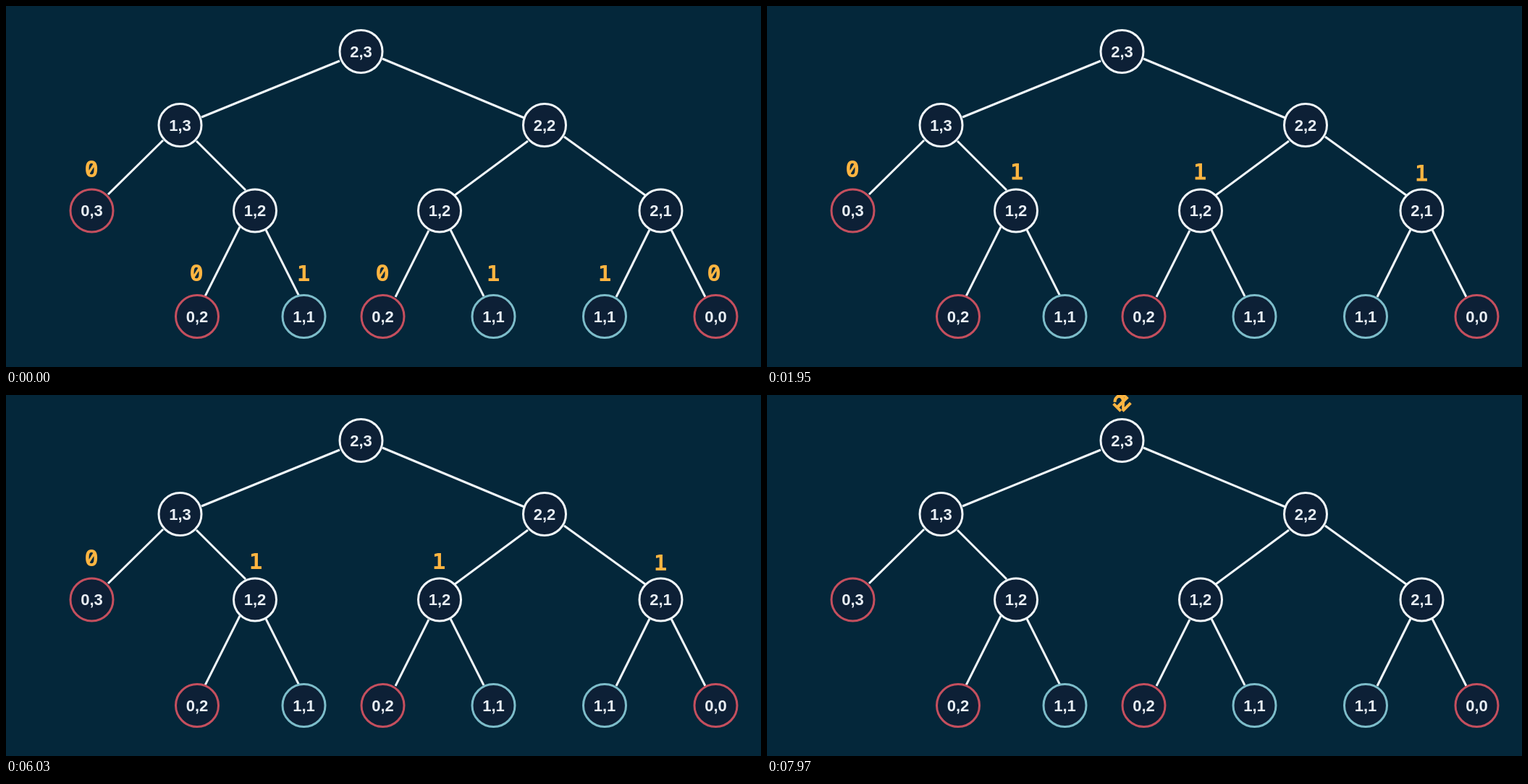
Recreate the animation shown at these times as an HTML page. Size 1043 by 500 pixels, loop 8000 ms.

```html
<!DOCTYPE html>
<html lang="en">
<head>
<meta charset="utf-8">
<title>Recursion tree</title>
<style>
  html, body { margin: 0; width: 100%; height: 100%; overflow: hidden; background: #04273a; }
  svg { display: block; width: 100%; height: 100%; }
  .edge { stroke: #f1f7fa; stroke-width: 3; }
  .node { fill: #0d2036; stroke-width: 3; }
  .label { font: bold 22px "Liberation Sans", Arial, sans-serif; fill: #e9eff5; text-anchor: middle; }
  .digit { font: bold 32px "Noto Sans Mono", monospace; fill: #ffb541; text-anchor: middle; }
  .one { font-family: "DejaVu Sans Mono", monospace; font-size: 31px; }
</style>
</head>
<body>
<svg id="stage" viewBox="0 0 1043 500"></svg>
<script>
const LOOP = 8000;
const TILT = 45;
const stage = document.getElementById('stage');
const WHITE = '#f1f7fa', RED = '#c54f5e', BLUE = '#7dbdca';

function add(tag, attrs, text) {
  const el = document.createElementNS('http://www.w3.org/2000/svg', tag);
  for (const key in attrs) el.setAttribute(key, attrs[key]);
  if (text !== undefined) el.textContent = text;
  stage.appendChild(el);
  return el;
}

const edges = [
  [461, 76, 270, 154], [520, 73, 716, 155],
  [217, 186, 141, 261], [263, 187, 331, 255],
  [721, 187, 620, 262], [771, 181, 883, 262],
  [323, 306, 275, 402], [359, 310, 405, 402],
  [584, 311, 538, 403], [614, 310, 660, 402],
  [889, 310, 843, 403], [919, 310, 966, 403]
];
for (const [x1, y1, x2, y2] of edges) add('line', { class: 'edge', x1, y1, x2, y2 });

const nodes = [
  [490.5, 63, '2,3', WHITE],
  [240.5, 165, '1,3', WHITE], [744, 165, '2,2', WHITE],
  [118.5, 283.5, '0,3', RED], [344, 283.5, '1,2', WHITE],
  [599, 283.5, '1,2', WHITE], [904.5, 283.5, '2,1', WHITE],
  [264, 430, '0,2', RED], [411.5, 430, '1,1', BLUE],
  [520.5, 430, '0,2', RED], [673.5, 430, '1,1', BLUE],
  [827, 430, '1,1', BLUE], [980.5, 430, '0,0', RED]
];
for (const [cx, cy, text, stroke] of nodes) {
  add('circle', { class: 'node', cx, cy, r: 29.5, stroke });
  add('text', { class: 'label', x: cx, y: cy + 7.7 }, text);
}

function digit(value, x, y) {
  const el = add('text', { class: value === 1 ? 'digit one' : 'digit', y: 11.5 }, value);
  return { el, value, x, y };
}

const three = digit(0, 118, 225);
const leaves = [
  [0, 263], [1, 411], [0, 520], [1, 673], [1, 827], [0, 978]
].map(([value, x]) => digit(value, x, 369));

const sums = [];
function join(left, right, x, y, move, merge) {
  const out = digit(left.value + right.value, x, y);
  out.born = merge;
  [left, right].forEach((d, i) => {
    d.goal = { x, y, turn: i ? -TILT : TILT };
    d.move = move;
    d.merge = merge;
  });
  sums.push(out);
  return out;
}

// Each level: the span of the flight, then the span of the merge.
const low = [[465, 795], [1690, 1960]];
const mid = [[6050, 6460], [6890, 7330]];
const a = join(leaves[0], leaves[1], 345, 229, ...low);
const b = join(leaves[2], leaves[3], 598, 229, ...low);
const c = join(leaves[4], leaves[5], 904, 231, ...low);
const l = join(three, a, 240, 115, ...mid);
const r = join(b, c, 743, 115, ...mid);
for (const [d, turn] of [[l, TILT], [r, -TILT]]) {
  d.goal = { x: 490, y: 10, turn };
  d.move = [7560, 7965];
}

const part = (t, [from, to]) => Math.min(1, Math.max(0, (t - from) / (to - from)));
const ease = p => p < 0.5 ? 2 * p * p : 1 - 2 * (1 - p) * (1 - p);

function place(d, t) {
  const flight = ease(part(t, d.move));
  const shown = d.born ? part(t, d.born) : 1;
  const gone = d.merge ? part(t, d.merge) : 0;
  const x = d.x + (d.goal.x - d.x) * flight;
  const y = d.y + (d.goal.y - d.y) * flight;
  const turn = d.goal.turn * flight * (1 - ease(gone))
    + (d.born ? TILT * (1 - ease(shown)) : 0);
  d.el.setAttribute('transform', `translate(${x} ${y}) rotate(${turn})`);
  d.el.setAttribute('opacity', Math.min(1, shown * 1.5) * Math.max(0, 1 - gone * 1.5));
}

const digits = [three, ...leaves, ...sums];
const start = performance.now();
function frame() {
  const t = (performance.now() - start) % LOOP;
  for (const d of digits) place(d, t);
  requestAnimationFrame(frame);
}
frame();
</script>
</body>
</html>
```
